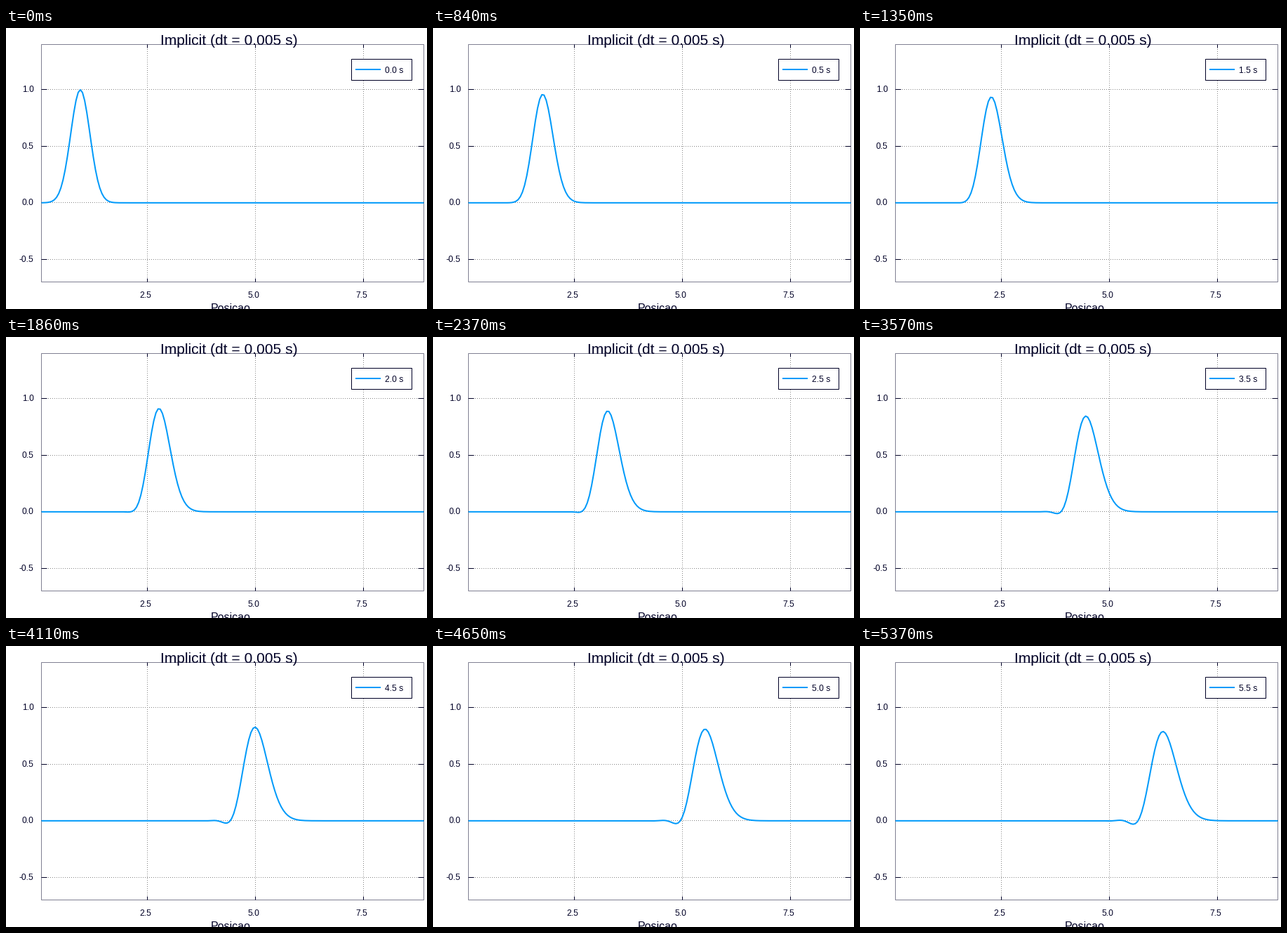
Recreate the animation shown at these times as a matplotlib script. Size 600x400 px, loop 5400 ms.

```python
import math

import numpy as np
import matplotlib.pyplot as plt
from matplotlib.animation import FuncAnimation
from matplotlib.patches import Rectangle

W, H, DPI = 600, 400, 100
FRAMES, INTERVAL = 180, 30
LEFT, RIGHT, TOP, BOTTOM = 50.5, 595.5, 23.5, 361.5
INK, BLUE, FRAME, GRID = "#000026", "#009afa", "#808092", "#848484"
PX = 72 / DPI  # points per pixel

plt.rcParams["font.family"] = "Liberation Sans"

# Implicit centred advection of a Gaussian pulse
DX, DT, SPEED, STEPS = 0.05, 0.005, 1.0, 6
x = np.arange(1, 179) * DX
X0, X1, Y0, Y1 = x[0], x[-1], -0.7, 1.4


def solve():
    n = len(x)
    r = SPEED * DT / (2 * DX)
    system = np.eye(n) + r * (np.eye(n, k=1) - np.eye(n, k=-1))
    advance = np.linalg.matrix_power(np.linalg.inv(system), STEPS)
    states = [np.exp(-10 * (x - 0.95) ** 2)]
    for _ in range(FRAMES - 1):
        states.append(advance @ states[-1])
    return states


def px(v):
    return LEFT + (v - X0) * (RIGHT - LEFT) / (X1 - X0)


def py(v):
    return BOTTOM - (v - Y0) * (BOTTOM - TOP) / (Y1 - Y0)


def crisp(v):
    """Centre of the pixel that holds v."""
    return math.floor(v) + 0.5


fig = plt.figure(figsize=(W / DPI, H / DPI), dpi=DPI, facecolor="white")
ax = fig.add_axes([0, 0, 1, 1])
ax.set_xlim(0, W)
ax.set_ylim(H, 0)
ax.axis("off")


def segment(xs, ys, color, width=1, **kw):
    style = dict(solid_capstyle="butt", snap=False) | kw
    return ax.plot(xs, ys, color=color, lw=width * PX, **style)[0]


def label(cx, base, text, size, ha="center"):
    return ax.text(cx, base, text, size=size * PX, color=INK, ha=ha,
                   va="baseline", zorder=6)


def box(x0, y0, x1, y1, edge, **kw):
    ax.add_patch(Rectangle((x0, y0), x1 - x0, y1 - y0, ec=edge, lw=PX,
                           snap=False, joinstyle="miter", **kw))


dots = dict(linestyle=(0, (1, 2)), dash_capstyle="butt", zorder=1)
for v in (2.5, 5.0, 7.5):
    gx = crisp(px(v))
    segment([gx, gx], [BOTTOM - 0.5, TOP], GRID, **dots)
    segment([gx, gx], [TOP, TOP + 5], INK, zorder=3)
    segment([gx, gx], [BOTTOM, BOTTOM - 5], INK, zorder=3)
    label(gx - 3, 383.5, f"{v:.1f}", 12)

for v in (-0.5, 0.0, 0.5, 1.0):
    gy = crisp(py(v))
    segment([LEFT + 0.5, RIGHT], [gy, gy], GRID, **dots)
    segment([LEFT, LEFT + 8], [gy, gy], INK, zorder=3)
    segment([RIGHT, RIGHT - 8], [gy, gy], INK, zorder=3)
    label(39.5, gy + 3.5, f"{v:.1f}", 12, "right")

box(LEFT, TOP, RIGHT, BOTTOM, FRAME, fc="none", zorder=2)
label(318, 24, "Implicit (dt = 0.005 s)", 21)
label(320.5, 403.5, "Posicao", 16)

box(492.5, 44.5, 578.5, 74.5, INK, fc="white", zorder=5)
segment([498, 534], [59, 59], BLUE, 2, zorder=6)
clock = label(540, 64, "", 12, "left")

states = solve()
wave = segment(px(x), py(states[0]), BLUE, 2, zorder=4,
               solid_joinstyle="round")


def update(i):
    wave.set_ydata(py(states[i]))
    clock.set_text(f"{i // 15 / 2:.1f} s")
    return wave, clock


anim = FuncAnimation(fig, update, frames=FRAMES, interval=INTERVAL,
                     repeat=True, repeat_delay=0, blit=False)
plt.show()
```
